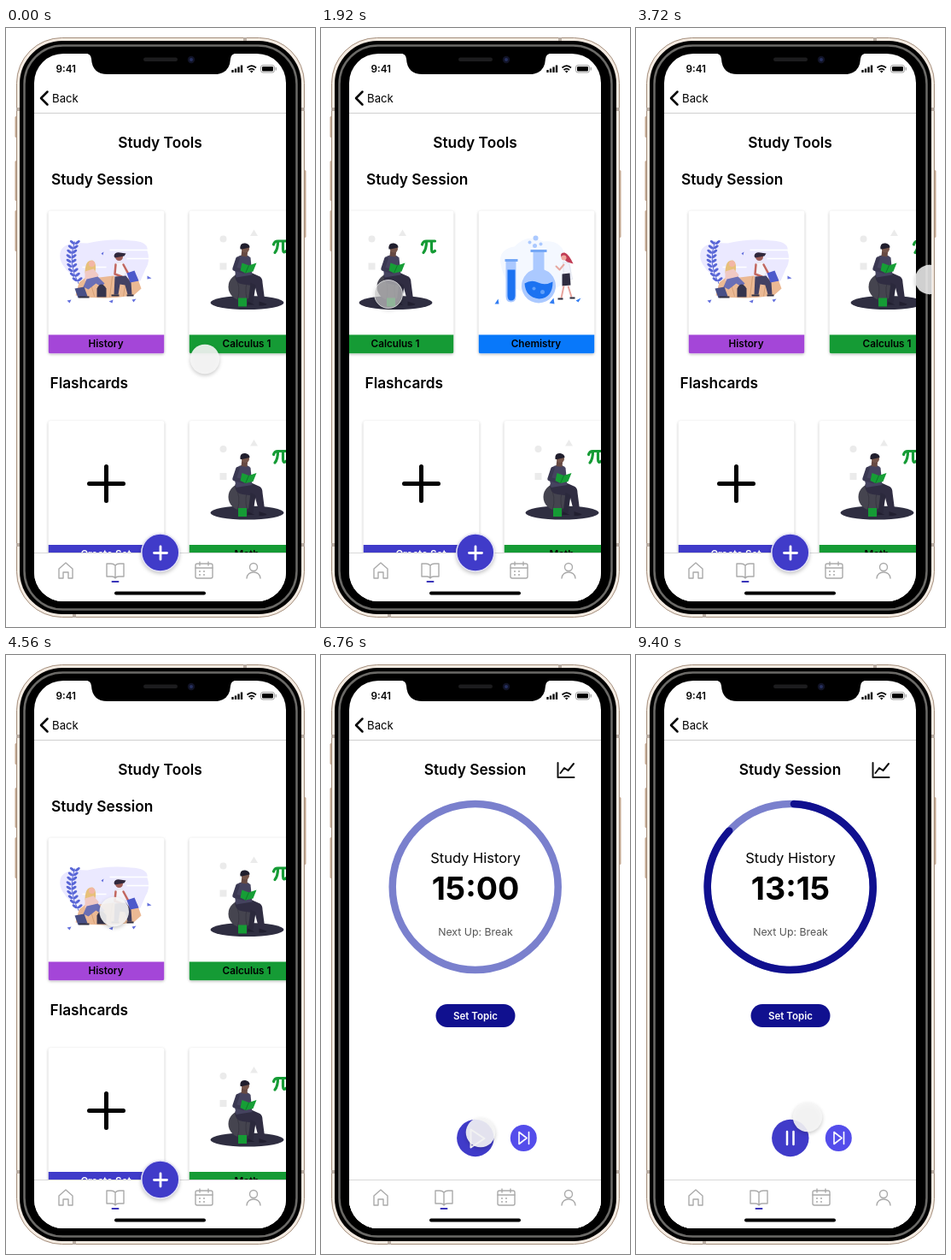
An HTML page for the animation above (9.44 s loop, 362 by 700 pixels).

```html
<!DOCTYPE html>
<html lang="en">
<head>
<meta charset="utf-8">
<title>Study app</title>
<style>
  html, body { margin: 0; width: 100%; height: 100%; overflow: hidden; background: #fff; }
  svg { display: block; width: 362px; height: 700px; font-family: Inter, Roboto, sans-serif; }
  .mid { text-anchor: middle; }
  .semi { font-weight: 600; }
  .title { font-weight: 600; font-size: 17.3px; }
  .label { font-weight: 600; font-size: 11.7px; text-anchor: middle; }
  .line { fill: none; stroke-linecap: round; stroke-linejoin: round; }
  .card { filter: drop-shadow(0 1px 1.5px rgba(0,0,0,.25)); }
  .lift { filter: drop-shadow(0 2px 2px rgba(0,0,0,.22)); }
</style>
</head>
<body>
<svg viewBox="0 0 362 700">
  <defs>
    <clipPath id="screenClip"><rect x="33" y="30" width="295" height="640" rx="34"/></clipPath>
    <clipPath id="bodyClip"><rect x="15" y="14" width="332" height="672" rx="50"/></clipPath>
    <clipPath id="cardClip"><rect width="136" height="167" rx="3"/></clipPath>
    <filter id="soft"><feGaussianBlur stdDeviation=".7"/></filter>

    <g id="history">
      <path d="M15 46Q20 36 46 38Q72 32 97 35Q118 36 116 47Q120 58 114 68L108 82L61 84Q27 80 19 66Q11 56 15 46Z" fill="#ebe9ff"/>
      <path d="M72 46H117M92 56H119M40 66H68" stroke="#fff" stroke-width="1.500"/>
      <g id="fern" fill="#5966d6"></g>
      <path d="M32 99L36 84L45 77L60 78L76 76L89 80L104 77L109 91L100 99Q64 105 32 99Z" fill="#ebb994"/>
      <path d="M48 79L54 100M75 77L72 101M91 81L88 100" stroke="#d5a077" fill="none"/>
      <path d="M43 73Q43 57 52 58Q57 61 55 72Z" fill="#e7c07a"/>
      <circle cx="51" cy="62" r="3.500" fill="#f3b6a6"/>
      <path d="M43 71L53 68L59 75L57 82L43 82Z" fill="#f0c9c4"/>
      <path d="M45 80L58 77L66 85L62 89L56 85L47 92L41 89Z" fill="#6a6fb5"/>
      <path d="M57 91Q62 81 68 91L68 101H57Z" fill="#35344c"/>
      <path d="M31 91L42 89L46 100L35 102Z" fill="#484f86"/>
      <path d="M36 101H48" stroke="#2f2e41" stroke-width="2"/>
      <circle cx="83" cy="54" r="4.500" fill="#9d5c56"/>
      <path d="M77 53Q78 48 84 49L91 50L89 53L78 55Z" fill="#30283c"/>
      <path d="M78 61L87 60L91 72L88 80L78 79Z" fill="#f5f4fa" stroke="#dedbea" stroke-width=".6"/>
      <path d="M79 63L78 74L86 77M88 63L94 74" class="line" stroke="#c2675f" stroke-width="2.500"/>
      <path d="M78 77L91 76L97 84L98 98H93L90 87L84 86L82 98H77Z" fill="#434163"/>
      <path d="M92 73L101 70L106 82L96 84Z" fill="#4c59cb"/>
      <path d="M74 99H83M92 99H100" stroke="#2f2e41" stroke-width="2"/>
      <path d="M22 105L27 104L25 108ZM71 106L76 104L75 108ZM98 104L103 103L100 107ZM116 76L121 79L116 80ZM62 50L65 48L64 52Z" fill="#6470dd"/>
    </g>

    <g id="reading">
      <g fill="#ebebeb"><circle cx="40" cy="33" r="4"/><path d="M76 22L80.500 29.500H71.500Z"/><rect x="36" y="61" width="8" height="8"/></g>
      <path d="M99 39.500Q100 35.500 104 35.500H114M104 36Q104 45 100.500 49M110 36V45Q110 50.500 114 47" class="line" stroke="#159b35" stroke-width="3.200"/>
      <ellipse cx="68" cy="107.500" rx="43" ry="8" fill="#2f2e41"/>
      <circle cx="61.500" cy="89" r="15.500" fill="#45444f"/>
      <path d="M54 77Q61 88 57 104M70 77Q64 90 68 104" fill="none" stroke="#373641"/>
      <path d="M57.500 102H67.500V112H57.500Z" fill="#159b35"/>
      <path d="M54 74L74 73L83 77Q86 79 86 84L89 107H82L77 88L63 86Q53 85 54 74Z" fill="#302d42"/>
      <path d="M72 84L78 87L75 108H69Z" fill="#2b293c"/>
      <path d="M82 106L91 109Q91 111 82 111ZM69 106L77 110H68Z" fill="#211f30"/>
      <path d="M58 53Q67 49 72 55L74 75L55 78L53 66Z" fill="#45435f"/>
      <path d="M57 56L53 68L64 71L69 67" class="line" stroke="#3a3852" stroke-width="4.500"/>
      <path d="M62 44H69L68 54L61 53Z" fill="#674a43"/>
      <circle cx="66" cy="44.500" r="4.500" fill="#77564b"/>
      <path d="M60 45Q59 37 66 38Q71 39 71 43L62 45Z" fill="#201e2d"/>
      <path d="M62 61L70 64L79 61L75 71L66 73L60 70Z" fill="#169e36"/>
      <path d="M70 64L66 73" stroke="#0d7928"/>
    </g>

    <g id="chemistry">
      <path d="M26 62Q23 45 42 42Q57 26 76 36Q98 33 102 55Q113 65 106 80Q89 96 63 96Q31 95 26 62Z" fill="#f4f8ff"/>
      <g fill="#abc9ff">
        <circle cx="67" cy="32" r="3"/><circle cx="60" cy="37" r="2"/><circle cx="73" cy="39" r="2"/><circle cx="66" cy="41" r="2.500"/>
        <path d="M32 58H44V100Q44 107 38 107Q32 107 32 100Z"/>
        <path d="M64 47H77V69A20 20 0 1 1 64 69Z"/>
      </g>
      <path d="M31 58H46M61 47H80" stroke="#74a7f6" stroke-width="3"/>
      <path d="M34 69H43V99Q43 105 38 105Q34 105 34 99Z" fill="#1c72f1"/>
      <path d="M54 85Q62 80 70 84T87 83Q87 102 71 103Q55 101 54 85Z" fill="#1c72f1"/>
      <circle cx="65" cy="91" r="2" fill="#609ff9"/><circle cx="75" cy="95" r="2.500" fill="#609ff9"/>
      <path d="M97 54Q95 49 101 49Q106 51 111 62L104 60Z" fill="#c13c54"/>
      <circle cx="100" cy="55" r="3" fill="#f0aaa0"/>
      <path d="M99 60L106 61L110 80L100 80Z" fill="#f1f3fb" stroke="#d8dde9" stroke-width=".7"/>
      <path d="M100 63L95 69L91 65" class="line" stroke="#e7a8a0" stroke-width="2"/>
      <path d="M98 74L107 73L108 87L98 88Z" fill="#2e2d40"/>
      <path d="M100 88L97 102M105 88L109 101" stroke="#e8a49d" stroke-width="2"/>
      <path d="M93 103H99M107 102H113" stroke="#292839" stroke-width="2"/>
      <path d="M19 109L23 103L24 109ZM83 108L88 102L89 109ZM114 105L120 102L117 107Z" fill="#347ef3"/>
    </g>

    <g id="create"><path d="M48 73.500H88M68 53.500V93.500" stroke="#000" stroke-width="5" stroke-linecap="round"/></g>

    <g id="home" class="line" stroke="#aaa" stroke-width="1.400"><path d="M-8-2L0-9L8-2V9H3V2H-3V9H-8Z"/></g>
    <g id="book" class="line" stroke="#aaa" stroke-width="1.400">
      <path d="M0-6Q-2-8-5-8H-10V7H-4Q-1 7 0 9Q1 7 4 7H10V-8H5Q2-8 0-6V8"/>
      <path d="M-3.500 13H3.500" stroke="#3934b9" stroke-width="2"/>
    </g>
    <g id="calendar" class="line" stroke="#aaa" stroke-width="1.400">
      <rect x="-10" y="-8" width="20" height="17" rx="2"/><path d="M-10-3H10M-5-10V-6M5-10V-6"/>
      <path d="M-5 1H5M-5 5H5" stroke-width="2" stroke-dasharray="0 5"/>
    </g>
    <g id="person" class="line" stroke="#aaa" stroke-width="1.400"><circle cy="-4" r="4.500"/><path d="M-8 9Q-7 2 0 2T8 9"/></g>
  </defs>

  <!-- phone body -->
  <g fill="#c3a78f">
    <rect x="10.500" y="103" width="4" height="25" rx="1.500"/><rect x="10.500" y="155" width="4" height="47" rx="1.500"/>
    <rect x="10.500" y="213" width="4" height="48" rx="1.500"/><rect x="347.500" y="166" width="4" height="79" rx="1.500"/>
  </g>
  <rect x="12.500" y="11.500" width="337" height="677" rx="53" fill="#f4ebe2" stroke="#a58f7d"/>
  <path d="M280 11V15M80 685V689M12 95H16M346 95H350M12 604H16M346 604H350" stroke="#b8aca2" stroke-width="4"/>
  <rect x="16" y="15" width="330" height="670" rx="50"/>
  <rect x="21.500" y="20.500" width="319" height="659" rx="45" fill="none" stroke="#6b6a67" stroke-width="2.500" filter="url(#soft)"/>
  <rect x="33" y="30" width="295" height="640" rx="34" fill="#fff"/>

  <g clip-path="url(#screenClip)">
    <g id="tools">
      <text x="180.500" y="140" class="title mid">Study Tools</text>
      <text x="53" y="182.500" class="title">Study Session</text>
      <text x="51.500" y="421" class="title">Flashcards</text>
      <g id="carousel"></g>
      <g id="flashcards"></g>
      <g id="toolTabs"></g>
      <g class="lift">
        <circle cx="180.800" cy="613" r="22" fill="#403bc9" stroke="#e3e2f6" stroke-width="1.500"/>
        <path d="M173.500 613.500H188.500M181 606V621" stroke="#fff" stroke-width="2.800" stroke-linecap="round"/>
      </g>
    </g>

    <g id="session">
      <rect x="33" y="101" width="295" height="570" fill="#fff"/>
      <text x="180.500" y="140" class="title mid">Study Session</text>
      <path d="M277.500 126V143H296.500M280.500 138L285 132L289.500 135L296 127" class="line" stroke="#111" stroke-width="2"/>
      <circle cx="180.700" cy="271" r="97" fill="none" stroke="#7a80cd" stroke-width="8.500"/>
      <circle id="progress" cx="180.700" cy="271" r="97" class="line" stroke="#10108f" stroke-width="8.500" pathLength="360" transform="rotate(-87.500 180.700 271)"/>
      <text x="181" y="242.500" class="mid" font-size="16.500">Study History</text>
      <g class="mid" font-size="37.500" font-weight="700">
        <text id="fullTime" x="181" y="285.500">15:00</text>
        <text id="leftTime" x="181" y="285.500">13:15</text>
      </g>
      <text x="181" y="328" class="mid" font-size="12.300" fill="#555">Next Up: Break</text>
      <rect x="134.500" y="408" width="93" height="27" rx="13.500" fill="#10108f"/>
      <text x="181" y="425.500" class="mid semi" font-size="11.500" fill="#fff">Set Topic</text>
      <circle cx="180.800" cy="564.500" r="21.700" fill="#403bc9"/>
      <path id="play" d="M175.500 554.500V575.500L191.500 565Z" class="line" stroke="#fff" stroke-width="2"/>
      <path id="pause" d="M177 557V572M184.500 557V572" stroke="#fff" stroke-width="2.500" stroke-linecap="round"/>
      <circle cx="237.300" cy="564.500" r="15.500" fill="#544deb"/>
      <path d="M232 557.500V571.500L241 564.500ZM243.500 557.500V571.500" class="line" stroke="#fff" stroke-width="1.600"/>
      <g id="sessionTabs"></g>
    </g>

    <path d="M33 99.500H328" stroke="#d0d0d0"/>
    <path d="M48.500 74.500L41 82L48.500 89.500" class="line" stroke="#000" stroke-width="2.500"/>
    <text x="54" y="86.500" font-size="13.200">Back</text>
    <text x="58.500" y="52" font-size="11.700" class="semi">9:41</text>
    <path d="M265.500 52V49M269 52V47.500M272.500 52V45.500M276 52V43.500" stroke="#000" stroke-width="2.300"/>
    <path d="M282.500 46.500Q287.700 41.800 293 46.500M284.500 49Q287.700 46.200 291 49" fill="none" stroke="#000" stroke-width="1.700"/>
    <path d="M285.900 50.500Q287.700 49 289.500 50.500L287.700 52.500Z"/>
    <rect x="298.500" y="43.500" width="16" height="8.500" rx="2.500" fill="#fff" stroke="#888" stroke-width=".8"/>
    <rect x="300" y="45" width="13" height="5.500" rx="1.200"/><path d="M316.200 46V49.500" stroke="#888"/>
    <rect x="127" y="658.500" width="107" height="4" rx="2"/>
  </g>

  <path d="M91 29H272Q263 30 263 36Q262 54 244 54H119Q101 54 100 36Q100 30 91 29Z"/>
  <rect x="161" y="34.500" width="40" height="4.500" rx="2.200" fill="#1c1c1e"/>
  <circle cx="217" cy="37" r="4.200" fill="#111326"/><circle cx="217" cy="37" r="2" fill="#26305f"/>

  <g clip-path="url(#bodyClip)"><circle id="touch" class="lift"/></g>
</svg>

<script>
const LOOP = 9440;
const $ = id => document.getElementById(id);

const card = (x, y, art, label, color, ink = '#000') => `
  <g class="card" transform="translate(${x} ${y})">
    <rect width="136" height="167" rx="3" fill="#fff"/>
    <g clip-path="url(#cardClip)">
      <use href="#${art}"/>
      <rect y="145" width="136" height="22" fill="${color}"/>
      <text x="67.500" y="159.500" class="label" fill="${ink}">${label}</text>
    </g>
  </g>`;

const tabs = positions => `
  <rect x="33" y="613" width="295" height="58" fill="#fff"/>
  <path d="M33 613.500H328" stroke="#d8d8d8"/>` +
  ['home', 'book', 'calendar', 'person']
    .map((icon, i) => `<use href="#${icon}" x="${positions[i]}" y="634"/>`).join('');

let leaves = '<path d="M31 36Q22 62 36 86" fill="none" stroke="#5966d6"/>';
for (let i = 0; i < 9; i++) {
  const y = 37 + i * 5.4, x = 27 + (i - 3.5) ** 2 * 0.35;
  for (const side of [-1, 1])
    leaves += `<ellipse cx="${x + side * 3}" cy="${y}" rx="3.400" ry="1.500" transform="rotate(${side * -35} ${x + side * 3} ${y})"/>`;
}
$('fern').innerHTML = leaves;
$('carousel').innerHTML =
  card(49.5, 213.5, 'history', 'History', '#a446d8') +
  card(214.5, 213.5, 'reading', 'Calculus 1', '#159b35') +
  card(379.5, 213.5, 'chemistry', 'Chemistry', '#0878fa');
$('flashcards').innerHTML =
  card(49.5, 459, 'create', 'Create Set', '#403bc9', '#fff') +
  card(214.5, 459, 'reading', 'Math', '#159b35');
$('toolTabs').innerHTML = tabs([70, 128, 232, 290]);
$('sessionTabs').innerHTML = tabs([70, 144, 217, 290]);

// Each row is [time, value, ...]; values ease between rows.
const touchPath = [
  [0, 233, 387], [800, 277, 303], [1000, 277, 303], [1800, 79, 311],
  [2150, 79, 311], [2600, 137, 300], [2700, 137, 300], [3650, 344, 294],
  [3850, 344, 294], [4600, 125, 300], [5200, 125, 300], [5760, 209, 378],
  [6600, 187, 558], [8900, 187, 558], [9400, 201, 540]
];
const pressPath = [
  [800, 0], [900, 1], [2000, 1], [2150, 0], [2600, 0], [2700, 1], [3600, 1], [3760, 0],
  [4700, 0], [4800, 1], [4950, 1], [5100, 0], [6800, 0], [6900, 1], [7900, 1], [8100, 0]
];
const scrollPath = [
  [1000, 0], [1800, -195], [2700, -195], [3650, 12], [3760, 12], [4000, 0]
];

const ease = p => p * p * (3 - 2 * p);
const ramp = (t, start, end) => ease(Math.min(1, Math.max(0, (t - start) / (end - start))));

function sample(path, t) {
  const next = path.findIndex(row => row[0] > t);
  if (next === 0) return path[0].slice(1);
  if (next < 0) return path.at(-1).slice(1);
  const a = path[next - 1], b = path[next], p = ramp(t, a[0], b[0]);
  return a.slice(1).map((v, i) => v + (b[i + 1] - v) * p);
}

function setAll(id, attributes) {
  for (const name in attributes) $(id).setAttribute(name, attributes[name]);
}

function draw() {
  const t = performance.now() % LOOP;
  const [x, y] = sample(touchPath, t);
  const [press] = sample(pressPath, t);
  const [scroll] = sample(scrollPath, t);
  const run = ramp(t, 7050, 7450);

  setAll('carousel', { transform: `translate(${scroll} 0)` });
  setAll('session', { opacity: ramp(t, 4950, 5150) });
  setAll('progress', { 'stroke-dasharray': `${310 * run} 360`, opacity: run > 0 ? 1 : 0 });
  for (const id of ['fullTime', 'play']) setAll(id, { opacity: 1 - run });
  for (const id of ['leftTime', 'pause']) setAll(id, { opacity: run });

  const grey = 247 - 42 * press;
  setAll('touch', {
    cx: x, cy: y, r: 17.3 - 0.8 * press,
    fill: `rgba(${grey},${grey},${grey},${0.9 - 0.22 * press})`,
    stroke: `rgba(255,255,255,${0.65 * press})`
  });
  requestAnimationFrame(draw);
}
draw();
</script>
</body>
</html>
```
